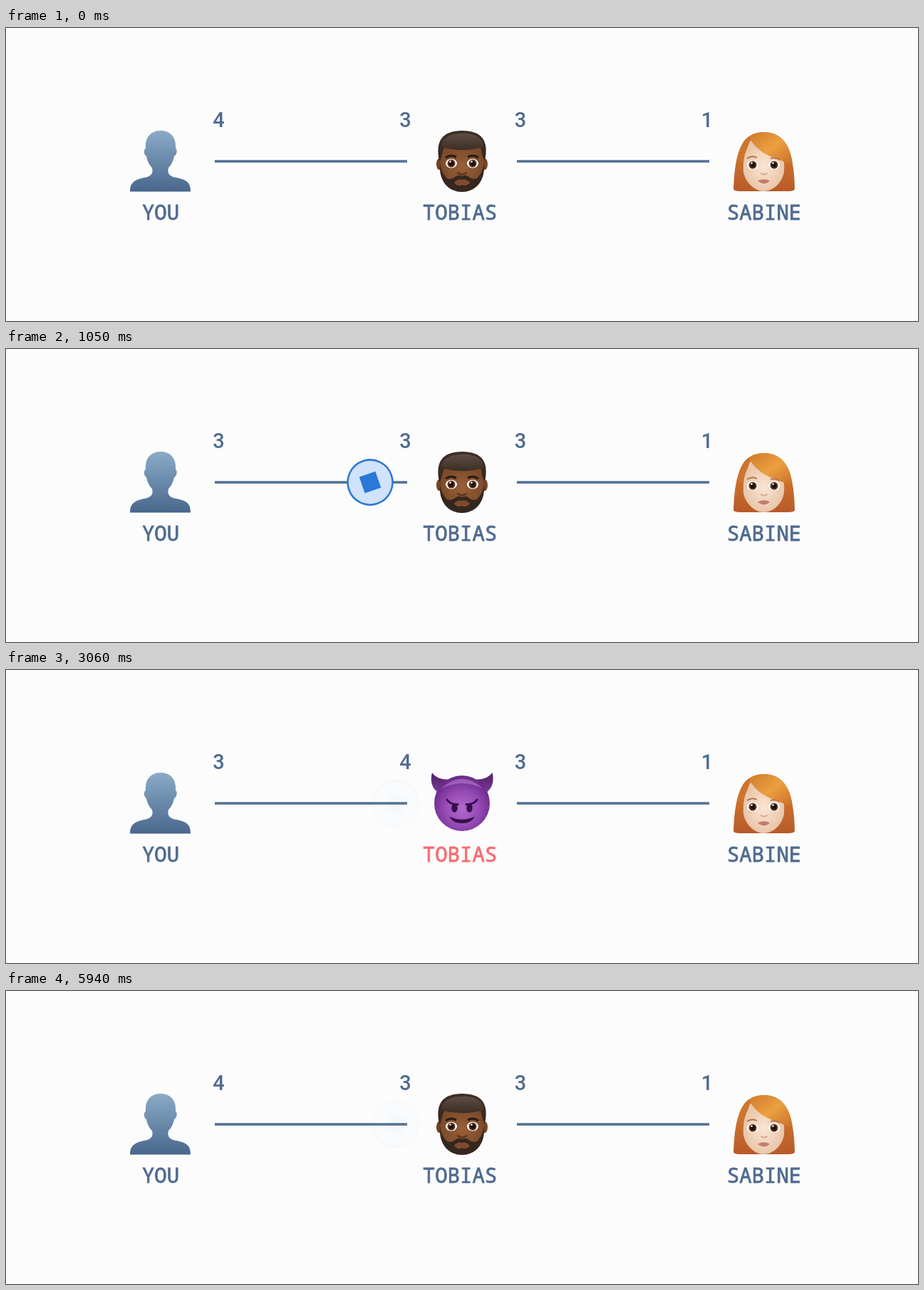
Write an HTML page that moves like this. It is 1280 by 411 pixels and loops after 6.51 s.

```html
<!DOCTYPE html>
<html lang="en">
<head>
<meta charset="utf-8">
<title>Payment channel</title>
<style>
  html, body { margin: 0; width: 100%; height: 100%; overflow: hidden; background: #fcfcfc; }
  svg { display: block; width: 100%; height: 100%; }
  text { text-anchor: middle; font-size: 29px; font-weight: 500; color: #4f6b8f; fill: currentColor; }
  .label { font-family: "Noto Sans Mono", monospace; }
  .label text { stroke: currentColor; stroke-width: .8px; }
  .digit { font-family: Roboto, sans-serif; }
</style>
</head>
<body>
<svg viewBox="0 0 1280 411">
  <defs>
    <linearGradient id="bustFill" x2="0" y2="1">
      <stop stop-color="#8aabc7"/><stop offset="1" stop-color="#49678c"/>
    </linearGradient>
    <linearGradient id="darkHair" x2="0" y2="1">
      <stop stop-color="#3d2f27"/><stop offset="1" stop-color="#35281f"/>
    </linearGradient>
    <linearGradient id="quiff" x2="0" y2="1">
      <stop stop-color="#5e4d42"/><stop offset="1" stop-color="#3c2e26"/>
    </linearGradient>
    <radialGradient id="darkSkin" cy=".45" r=".6">
      <stop stop-color="#965f38"/><stop offset="1" stop-color="#784727"/>
    </radialGradient>
    <radialGradient id="lightSkin">
      <stop stop-color="#fae5d3"/><stop offset="1" stop-color="#e9c6aa"/>
    </radialGradient>
    <linearGradient id="redHair" x2="0" y2="1">
      <stop stop-color="#d98430"/><stop offset="1" stop-color="#b85a2a"/>
    </linearGradient>
    <linearGradient id="fringe" x2="1" y2="1">
      <stop stop-color="#d07a2c"/><stop offset=".5" stop-color="#eba040"/><stop offset="1" stop-color="#c96c28"/>
    </linearGradient>
    <radialGradient id="purple" cy=".6" r=".55">
      <stop stop-color="#b368cf"/><stop offset=".55" stop-color="#984bb6"/><stop offset="1" stop-color="#6c2c8d"/>
    </radialGradient>
    <linearGradient id="hornFill" x2="0" y2="1">
      <stop stop-color="#4c2060"/><stop offset="1" stop-color="#7d3a98"/>
    </linearGradient>
    <g id="eye">
      <ellipse rx="8" ry="6.5" fill="#fff"/>
      <circle r="5.5" fill="#5b3420"/><circle r="3.4" fill="#1d100b"/>
      <circle cx="-1.5" cy="-2.5" r="1.3" fill="#fff"/>
    </g>
    <path id="horn" d="M598 144C595 156 598 165 605 171L624 153C613 155 603 151 598 144Z" fill="url(#hornFill)"/>
    <g id="devilEye" fill="#35104a">
      <ellipse cx="629.5" cy="193.5" rx="4.2" ry="6.2"/>
      <path d="M619 182Q624 189 634 188.5" fill="none" stroke="#35104a" stroke-width="3" stroke-linecap="round"/>
    </g>
  </defs>

  <path d="M293 187H563M717 187H987" stroke="#4e7193" stroke-width="3.7"/>

  <path fill="url(#bustFill)" d="M217 144C230 144 238 152 238 165V169C241 170 240 178 236 180C234 189 231 193 228 196C226 204 229 208 240 210C254 213 259 217 259 229.500H174C174 217 180 213 193 210C204 208 207 204 205 196C202 193 199 189 197 180C193 178 193 170 196 169V165C196 152 204 144 217 144Z"/>

  <g id="man">
    <ellipse cx="608" cy="191" rx="4" ry="8" fill="#744426"/>
    <ellipse cx="672" cy="191" rx="4" ry="8" fill="#744426"/>
    <path fill="url(#darkHair)" d="M608 186C602 158 613 144 640 144C668 144 678 158 672 186Z"/>
    <path fill="url(#darkSkin)" d="M610 184C612 180 612 174 615 168Q642 174 666 167C668 174 668 180 671 184C673 211 657 228 640 228C623 228 608 211 610 184Z"/>
    <path d="M611 162C616 151 630 147 647 148C662 149 671 157 670 167Q642 175 615 168Q611 166 611 162Z" fill="url(#quiff)"/>
    <path fill="#35271f" fill-rule="evenodd" d="M609 190Q611 203 619 211Q626 213 630 209Q635 205 640 208Q645 205 650 209Q654 213 661 211Q669 203 671 190C673 217 657 230 640 230C623 230 607 217 609 190ZM629 217Q634 211 640 213Q646 211 651 217Q646 223 640 220Q634 223 629 217Z"/>
    <path d="M630 215.500Q640 211.500 650 215.500Q640 222 630 215.500Z" fill="#81482f"/>
    <path d="M634 203Q640 208 646 203" fill="none" stroke="#5b351e" stroke-width="2.5" stroke-linecap="round"/>
    <path d="M617 182Q624 177 632 181M648 181Q656 177 663 182" fill="none" stroke="#2a1c15" stroke-width="3.2"/>
    <use href="#eye" x="625" y="190"/><use href="#eye" x="655" y="190"/>
  </g>

  <g id="devil">
    <use href="#horn"/><use href="#horn" transform="matrix(-1 0 0 1 1280.5 0)"/>
    <circle cx="640" cy="187" r="39" fill="url(#purple)"/>
    <path d="M610 167Q640 138 670 167Q640 151 610 167Z" fill="#c892da" opacity=".45"/>
    <use href="#devilEye"/><use href="#devilEye" transform="matrix(-1 0 0 1 1280 0)"/>
    <path d="M622 205.500Q640 214 658 205.500Q653 215 640 215Q627 215 622 205.500Z" fill="#35104a"/>
  </g>

  <g>
    <path fill="url(#redHair)" d="M1064 146C1034 146 1023 170 1021 226Q1022 229 1030 229H1098Q1106 229 1107 226C1106 170 1093 146 1064 146Z"/>
    <path fill="url(#lightSkin)" d="M1045 158C1036 170 1034 190 1035 202C1038 218 1052 229 1063 229C1076 229 1089 218 1092 202Q1093 192 1091 182Z"/>
    <path fill="url(#fringe)" d="M1043 152C1061 141 1083 146 1094 161Q1102 172 1104 192Q1098 190 1091 187C1078 182 1052 175 1043 152Z"/>
    <path d="M1043 152C1046 165 1036 170 1034 192Q1029 183 1027 184C1030 166 1035 157 1043 152Z" fill="#cd752e"/>
    <path d="M1040 183Q1047 178 1054 182M1073 183Q1080 181 1086 185" fill="none" stroke="#b87548" stroke-width="2"/>
    <use href="#eye" x="1048" y="192"/><use href="#eye" x="1078" y="192"/>
    <path d="M1060 204Q1064 207 1068 204" fill="none" stroke="#d9a68a" stroke-width="2" stroke-linecap="round"/>
    <path d="M1055 214.500Q1064 210 1072 214.500Q1064 222 1055 214.500Z" fill="#c47c6c"/>
  </g>

  <g class="label">
    <text x="217" y="269">YOU</text>
    <text x="637" y="269" id="peer">TOBIAS</text>
    <text x="1064" y="269">SABINE</text>
  </g>
  <g class="digit">
    <text x="298.500" y="138.500" id="leftBefore">4</text>
    <text x="298.500" y="138.500" id="leftAfter">3</text>
    <text x="560.500" y="138.500" id="rightBefore">3</text>
    <text x="560.500" y="138.500" id="rightAfter">4</text>
    <text x="722" y="138.500">3</text>
    <text x="984" y="138.500">1</text>
  </g>

  <g id="coin">
    <circle r="31.500" fill="#d0e2fc" stroke="#2f79d3" stroke-width="2.600"/>
    <rect x="-12" y="-12" width="24" height="24" fill="#2a78d8"/>
  </g>
</svg>
<script>
const LOOP = 6510;
const $ = id => document.getElementById(id);
const progress = (t, start, length) => Math.min(1, Math.max(0, (t - start) / length));
const fade = (t, start, length) => 1 - (1 - progress(t, start, length)) ** 1.2;

// Cubic Bezier easing with control points (x1, 0) and (x2, 1).
function ease(u, x1, x2) {
  let low = 0, high = 1;
  for (let i = 0; i < 24; i++) {
    const s = (low + high) / 2, r = 1 - s;
    if (3 * r * r * s * x1 + 3 * r * s * s * x2 + s ** 3 < u) low = s; else high = s;
  }
  return low * low * (3 - 2 * low);
}

function crossfade(before, after, amount) {
  $(before).style.opacity = 1 - amount;
  $(after).style.opacity = amount;
}

function mixColor(from, to, amount) {
  return `rgb(${from.map((c, i) => Math.round(c + (to[i] - c) * amount))})`;
}

function draw(t) {
  const vanish = fade(t, 2760, 300);
  const reset = fade(t, 5670, 270);
  const evil = vanish * (1 - reset);
  const digitReset = 1 - reset ** 2;

  const x = 320 + 227 * ease(progress(t, 420, 900), 0.35, 0.55);
  $('coin').setAttribute('transform', `translate(${x} 187) rotate(${14 + (x - 547) * 0.92})`);
  // A faint trace of the coin stays behind after it is taken.
  $('coin').style.opacity = fade(t, 420, 180) * (1 - 0.975 * vanish);

  crossfade('leftBefore', 'leftAfter', fade(t, 420, 240) ** 2 * digitReset);
  crossfade('rightBefore', 'rightAfter', fade(t, 1080, 240) ** 2 * digitReset);
  crossfade('man', 'devil', evil);
  $('peer').style.color = mixColor([79, 107, 143], [248, 108, 112], Math.sqrt(evil));
}

const begin = performance.now();
function tick() {
  draw((performance.now() - begin) % LOOP);
  requestAnimationFrame(tick);
}
tick();
</script>
</body>
</html>
```
